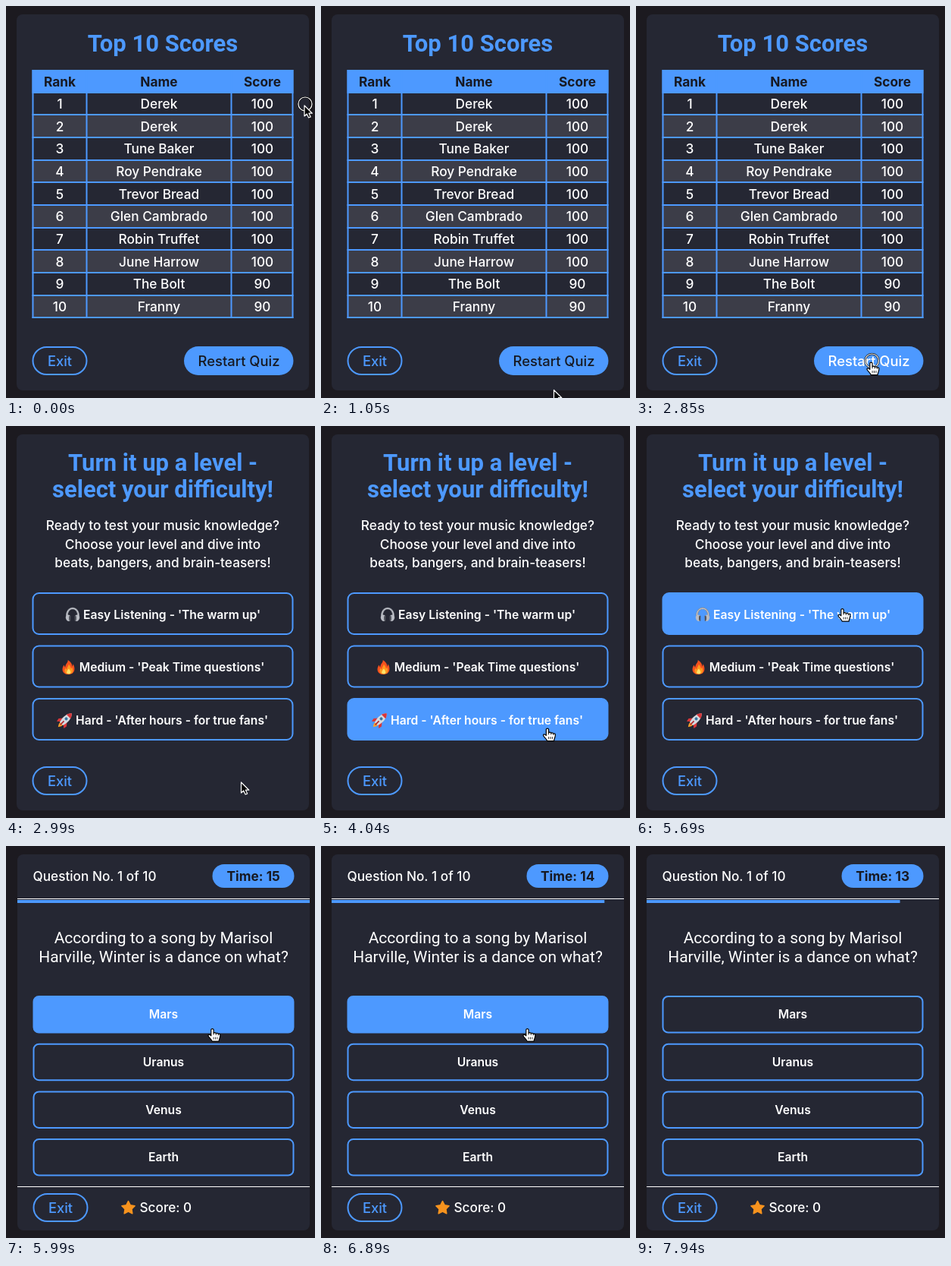
An HTML page with a canvas for the animation above (8540 ms loop, 408 by 516 pixels).

```html
<!DOCTYPE html>
<html lang="en">
<head>
<meta charset="utf-8">
<title>Music quiz</title>
<style>
  html, body { margin: 0; width: 100%; height: 100%; overflow: hidden; background: #1c1a20; }
  canvas { display: block; width: 408px; height: 516px; }
</style>
</head>
<body>
<canvas id="stage"></canvas>
<script>
const W = 408, H = 516, LOOP = 8540;
const BLUE = '#4d99ff', PANEL = '#252733', PAGE = '#1c1a20', STRIPE = '#3c3d48', INK = '#171922', WHITE = '#fff';
const INTER = 'Inter, sans-serif', ROBOTO = 'Roboto, sans-serif';
const LEFT = 34.5, RIGHT = 379.5, MID = 207;

const canvas = document.getElementById('stage');
const ctx = canvas.getContext('2d');
const dpr = window.devicePixelRatio || 1;
canvas.width = W * dpr;
canvas.height = H * dpr;

const scores = [
  ['Derek', 100], ['Derek', 100], ['Tune Baker', 100], ['Roy Pendrake', 100], ['Trevor Bread', 100],
  ['Glen Cambrado', 100], ['Robin Truffet', 100], ['June Harrow', 100], ['The Bolt', 90], ['Franny', 90]
];
const levels = [
  ["Easy Listening - 'The warm up'", headphones],
  ["Medium - 'Peak Time questions'", flame],
  ["Hard - 'After hours - for true fans'", rocket]
];
const answers = ['Mars', 'Uranus', 'Venus', 'Earth'];

// Pointer stops: start time, x, y; no position means it is off stage.
const stops = [
  [0, 394, 131], [150, 388, 105], [300, 372, 58], [450, 353, 8], [600],
  [1050, 307.5, 505.5], [1200, 305, 497], [1350, 302, 489], [1500, 300, 483],
  [1650, 298, 479], [1800, 297, 476], [1950, 296, 474.5], [2100, 310.5, 469],
  [3890, 308, 449], [4040, 299, 398], [4190, 288, 330], [4340, 278, 268], [4490, 272.5, 240.5],
  [7190, 284, 268], [7340, 315, 345], [7490, 388, 482], [7640]
];
const clicks = [[0, 150], [2850, 2990], [5540, 5690]];

const arrow = new Path2D('M0 0V14L3.2 11L5.6 16L8.2 14.9L5.9 10.2H10.3Z');
const hand = new Path2D('M-1.7 1.6C-1.7-.5 1.6-.5 1.6 1.6V6C2 4.7 4.7 4.8 4.8 6.4C5.4 5.4 7.7 5.6 7.8 7.2' +
  'C8.4 6.4 10.4 6.7 10.4 8.5C10.4 12 9 13 8.6 16.6H-.4C-1 14-4.6 11.6-5.4 9.6C-6 7.6-3.6 7.2-1.7 9.4Z');
const knuckles = new Path2D('M1.6 6V8.4M4.8 6.4V8.6M7.8 7.2V9M1.6 11V14M4 11V14M6.4 11V14');

function text(str, x, y, size, { color = WHITE, weight = 500, family = INTER, align = 'center' } = {}) {
  ctx.font = `${weight} ${size}px ${family}`;
  ctx.textAlign = align;
  ctx.fillStyle = color;
  ctx.fillText(str, x, y);
}

function rect(x, y, w, h, color) {
  ctx.fillStyle = color;
  ctx.fillRect(x, y, w, h);
}

function box(b, radius, fill, stroke) {
  const inset = stroke ? 1 : 0;
  ctx.beginPath();
  ctx.roundRect(b.x + inset, b.y + inset, b.w - 2 * inset, b.h - 2 * inset, radius - inset);
  if (fill) { ctx.fillStyle = fill; ctx.fill(); }
  if (stroke) { ctx.strokeStyle = stroke; ctx.lineWidth = 2; ctx.stroke(); }
}

function shape(d, fill) {
  ctx.fillStyle = fill;
  ctx.fill(new Path2D(d));
}

function line(d, color, width) {
  ctx.strokeStyle = color;
  ctx.lineWidth = width;
  ctx.stroke(new Path2D(d));
}

function at(x, y, draw) {
  ctx.save();
  ctx.translate(x, y);
  draw();
  ctx.restore();
}

function headphones() {
  line('M-7.6 4C-9-12 9-12 7.6 4', '#8c8f98', 2.6);
  line('M-7.6 2C-8.4-11 8.4-11 7.6 2', '#d3d6dc', 1);
  for (const side of [-1, 1]) {
    ctx.save();
    ctx.scale(side, 1);
    shape('M3.4 1.5C6-.8 9.6 1 9.2 4.6C8.8 8.2 5.6 10 3.6 8.6Z', '#b9bcc4');
    shape('M2.6 2C4 .8 5 1.6 5 4.8C5 8 4.2 9.4 2.8 8.6Z', '#50535c');
    ctx.restore();
  }
}

function flame() {
  shape('M-1-9.5C3-7 5-3.5 4.6-1C5.4-1.6 5.8-3 5.6-4.2C9 0 9.2 9.5 0 9.5C-9.5 9.5-9.5 1-6-3C-5.8-1.4-5.2-.6-4.4-.2C-4.6-4-.6-6-1-9.5Z', '#f4511e');
  shape('M0-4C2.6-1 3 1 3 2C3.8 1.6 4.2.8 4.4 0C7 5 5.4 9 0 9C-5.6 9-6.4 4.6-4.2 1C-3.8 2.2-3 2.8-2.4 3C-2.6 0 .2-1.4 0-4Z', '#ff9a1f');
  shape('M.2 2C3 5 3.8 8.8 0 8.8C-4 8.8-2.6 4.8.2 2Z', '#ffe36b');
}

function rocket() {
  ctx.rotate(Math.PI / 4);
  shape('M-2.4 6.5C-3 9.5-1 11 0 13C1 11 3 9.5 2.4 6.5Z', '#ffa42b');
  shape('M-3.6 0L-7.4 4.6L-6.6 9L-3 6ZM3.6 0L7.4 4.6L6.6 9L3 6Z', '#d9363a');
  shape('M0-12.5C4.4-8.5 5.4-1 3 7H-3C-5.4-1-4.4-8.5 0-12.5Z', '#d5dae0');
  shape('M0-12.5C2-10.6 3.2-8.6 3.8-6.4H-3.8C-3.2-8.6-2-10.6 0-12.5Z', '#d9363a');
  shape('M-2-2.2A2 2 0 1 0 2-2.2A2 2 0 1 0-2-2.2', '#37759f');
  shape('M-.8 2H.8V9H-.8Z', '#b3272d');
}

function star() {
  ctx.beginPath();
  for (let i = 0; i < 10; i++) {
    const r = i % 2 ? 4.6 : 9, a = i * Math.PI / 5 - Math.PI / 2;
    ctx.lineTo(r * Math.cos(a), r * Math.sin(a));
  }
  ctx.closePath();
  ctx.fillStyle = ctx.strokeStyle = '#f7931e';
  ctx.lineWidth = 1.6;
  ctx.lineJoin = 'round';
  ctx.fill();
  ctx.stroke();
}

const bar = (y, h) => ({ x: LEFT, y, w: RIGHT - LEFT, h });
const exit = y => ({ x: LEFT, y, w: 73, h: 38 });
const restart = { x: 235, y: 448, w: RIGHT - 235, h: 38 };
const pages = {
  scores: { draw: drawScores, buttons: [restart, exit(448)] },
  levels: { draw: drawLevels, buttons: [...levels.map((_, i) => bar(219 + i * 69.5, 56)), exit(448)] },
  question: { draw: drawQuestion, buttons: [...answers.map((_, i) => bar(197 + i * 62.7, 49.5)), exit(457)] }
};

function title(str, y) {
  text(str, MID, y, 31, { color: BLUE, weight: 700, family: ROBOTO });
}

function drawExit(b) {
  box(b, b.h / 2, null, BLUE);
  text('Exit', 71, b.y + 26, 18.4, { color: BLUE });
}

function drawScores(buttons, over) {
  const top = 84, first = 113, cols = [71, 202, 338.5];
  const edge = i => first + Math.floor(i * 29.67);
  title('Top 10 Scores', 59.5);
  scores.forEach((row, i) => {
    if (i % 2) rect(LEFT, edge(i), RIGHT - LEFT, edge(i + 1) - edge(i), STRIPE);
    [i + 1, ...row].forEach((cell, c) => text(String(cell), cols[c], 135.1 + i * 29.67, 17.3));
  });
  rect(LEFT, top, RIGHT - LEFT, first - top, BLUE);
  ['Rank', 'Name', 'Score'].forEach((h, c) => text(h, cols[c], 106, 17.3, { color: INK, weight: 700 }));
  for (let i = 0; i <= scores.length; i++) rect(LEFT, edge(i), RIGHT - LEFT, 2, BLUE);
  for (const x of [LEFT, 105.5, 296.5, RIGHT - 2]) rect(x, top, 2, edge(scores.length) + 2 - top, BLUE);
  box(restart, 19, BLUE);
  text('Restart Quiz', 307.5, 474, 18.4, { color: over === 0 ? WHITE : INK });
  drawExit(buttons[1]);
}

function drawLevels(buttons, over) {
  title('Turn it up a level -', 59);
  title('select your difficulty!', 94);
  ['Ready to test your music knowledge?', 'Choose your level and dive into', 'beats, bangers, and brain-teasers!']
    .forEach((s, i) => text(s, MID, 137 + i * 24.5, 17.3));
  levels.forEach(([label, icon], i) => {
    const b = buttons[i];
    box(b, 9, over === i ? BLUE : null, BLUE);
    text(label, 219, b.y + 34.6, 15.7, { weight: 600 });
    at(219 - ctx.measureText(label).width / 2 - 14, b.y + 29, icon);
  });
  drawExit(buttons[3]);
}

function drawQuestion(buttons, over, t) {
  const left = t < 6890 ? 15 : t < 7940 ? 14 : 13;
  text('Question No. 1 of 10', LEFT, 46, 17.2, { align: 'left' });
  box({ x: 271.5, y: 24, w: RIGHT - 271.5, h: 31 }, 15.5, BLUE);
  text('Time: ' + left, 325.7, 46, 17.3, { color: INK, weight: 700 });
  rect(14, 69, 386, 1, WHITE);
  rect(14, 71, 386 * left / 15, 4, BLUE);
  ['According to a song by Marisol', 'Harville, Winter is a dance on what?']
    .forEach((s, i) => text(s, MID, 128 + i * 24.5, 21, { weight: 400, family: ROBOTO }));
  answers.forEach((label, i) => {
    const b = buttons[i];
    box(b, 8, over === i ? BLUE : null, BLUE);
    text(label, MID, b.y + 30.2, 15.7, { weight: 600 });
  });
  rect(14, 448, 386, 1, WHITE);
  drawExit(buttons[4]);
  at(160.5, 476.5, star);
  text('Score: 0', 175.5, 482, 17.2, { align: 'left' });
}

function drawPointer(x, y, pressing, clicked) {
  if (clicked) {
    for (const [color, width] of [['#111', 2.6], [WHITE, 1.2]]) {
      ctx.beginPath();
      ctx.arc(x + 1, y - 2, 9, 0, 2 * Math.PI);
      ctx.strokeStyle = color;
      ctx.lineWidth = width;
      ctx.stroke();
    }
  }
  at(x, y, () => {
    ctx.lineJoin = 'round';
    ctx.lineWidth = 1.2;
    ctx.fillStyle = pressing ? WHITE : '#000';
    ctx.strokeStyle = pressing ? '#000' : WHITE;
    const path = pressing ? hand : arrow;
    ctx.fill(path);
    ctx.stroke(path);
    if (pressing) {
      ctx.lineWidth = 0.8;
      ctx.stroke(knuckles);
    }
  });
}

function render(t) {
  const page = t < 2990 ? pages.scores : t < 5990 ? pages.levels : pages.question;
  const [, x, y] = stops.filter(s => s[0] <= t).pop();
  const over = page.buttons.findIndex(b => x >= b.x && x <= b.x + b.w && y >= b.y && y <= b.y + b.h);
  ctx.setTransform(dpr, 0, 0, dpr, 0, 0);
  rect(0, 0, W, H, PAGE);
  // The question card lands one pixel to the right before it settles.
  at(t >= 5990 && t < 6140 ? 1 : 0, 0, () => {
    box({ x: 14, y: 11, w: 386, h: 495 }, 8, PANEL);
    page.draw(page.buttons, over, t);
  });
  if (x !== undefined) drawPointer(x, y, over >= 0, clicks.some(([a, b]) => t >= a && t < b));
}

const start = performance.now();
function tick() {
  render((performance.now() - start) % LOOP);
  requestAnimationFrame(tick);
}
tick();
</script>
</body>
</html>
```
